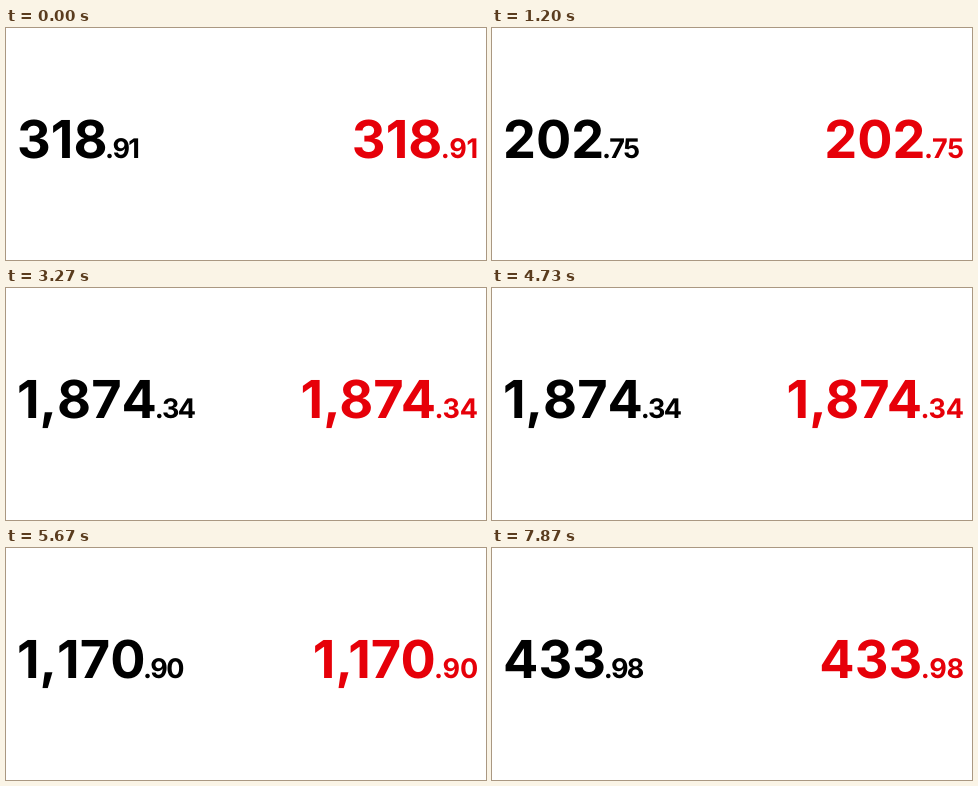
Write an HTML page with a canvas that moves like this. It is 480 by 232 pixels and loops after 8000 ms.

```html
<!DOCTYPE html>
<html lang="en">
<head>
<meta charset="utf-8">
<title>Rolling numbers</title>
<style>
  html, body { margin: 0; width: 100%; height: 100%; overflow: hidden; background: #fff; }
  canvas { display: block; width: 480px; height: 232px; }
</style>
</head>
<body>
<canvas id="stage" width="480" height="232"></canvas>
<script>
const ctx = document.getElementById('stage').getContext('2d');
const LOOP = 8000, FRAME = 1000 / 15;
const BASELINE = 130, LEFT = 11, RIGHT = 472, JOIN = 1.5, TRAVEL = 64;

// Glyphs are set at text size and scaled up, which keeps the text cut of the typeface
const TEXT_SIZE = 14;
ctx.font = `700 ${TEXT_SIZE}px Inter, sans-serif`;
ctx.textRendering = 'geometricPrecision';
const ZERO_WIDTH = ctx.measureText('0').width;

// A type style is a size and the advance of the digit zero
function typeStyle(size, zeroAdvance) {
  const scale = size / TEXT_SIZE;
  return { scale, tracking: zeroAdvance / scale - ZERO_WIDTH };
}
const BIG = typeStyle(52.3, 35.3);
const SMALL = typeStyle(27, 18);
const SMALL_TIGHT = typeStyle(27, 16.5);

function width(text, { scale, tracking }) {
  ctx.letterSpacing = `${tracking}px`;
  return ctx.measureText(text).width * scale;
}

function drawText(text, x, y, { scale, tracking }) {
  ctx.save();
  ctx.letterSpacing = `${tracking}px`;
  ctx.translate(x, y);
  ctx.scale(scale, scale);
  ctx.fillText(text, tracking / 2, 0);
  ctx.restore();
}

// Columns of the rolling number, left to right
const THOUSANDS = 0, COMMA = 1, HUNDREDS = 2, TENS = 3, ONES = 4, POINT = 5, TENTHS = 6, HUNDREDTHS = 7;
const initial = ['', '', '3', '1', '8', '.', '9', '1'];

// [start, duration, column, new character], in order of time
const rolls = [
  [475, 280, ONES, '2'],
  [475, 280, HUNDREDTHS, '5'],
  [540, 280, TENTHS, '7'],
  [690, 280, TENS, '0'],
  [900, 290, HUNDREDS, '2'],

  [2801, 1, THOUSANDS, '2'],
  [2801, 1, COMMA, ','],
  [2801, 1, ONES, '7'],
  [2801, 1, TENTHS, ''],
  [2801, 1, HUNDREDTHS, ''],
  [2802, 172, TENS, '1'],
  [2802, 212, TENTHS, '0'],
  [2802, 140, HUNDREDTHS, '0'],
  [2890, 270, ONES, '4'],
  [2930, 290, HUNDREDS, '8'],
  [2950, 250, HUNDREDTHS, '4'],
  [2970, 280, TENS, '7'],
  [2990, 270, THOUSANDS, '1'],
  [3010, 250, TENTHS, '3'],

  [4815, 330, ONES, '0'],
  [4815, 330, HUNDREDTHS, '0'],
  [4865, 330, TENTHS, '9'],
  [5350, 310, HUNDREDS, '1'],

  [7275, 300, ONES, '3'],
  [7275, 300, HUNDREDTHS, '8'],
  [7330, 300, TENS, '3'],
  [7390, 300, HUNDREDS, '4'],
  [7430, 290, THOUSANDS, ''],
  [7430, 290, COMMA, '']
];

// [start, whole part, decimals]
const totals = [
  [0, '318', '.91'],
  [530, '202', '.75'],
  [2860, '1,874', '.34'],
  [4860, '1,170', '.90'],
  [7330, '433', '.98']
];

const easeOut = x => 1 - (1 - x) ** 3;

function columnsAt(time) {
  const columns = initial.map(char => ({ from: char, to: char, progress: 1 }));
  for (const [start, duration, index, char] of rolls) {
    if (time < start) break;
    const progress = easeOut(Math.min(1, (time - start) / duration));
    columns[index] = { from: columns[index].to, to: char, progress };
  }
  return columns;
}

function drawRolling(time) {
  ctx.save();
  ctx.beginPath();
  ctx.rect(0, 78, 480, 66);
  ctx.clip();
  ctx.fillStyle = '#000';
  let x = LEFT;
  columnsAt(time).forEach(({ from, to, progress }, index) => {
    const style = index < POINT ? BIG : SMALL_TIGHT;
    if (index === POINT) x -= JOIN;
    if (progress < 1) {
      ctx.globalAlpha = Math.sqrt(1 - progress);
      drawText(from, x, BASELINE - TRAVEL * progress, style);
      ctx.globalAlpha = 1;
    }
    drawText(to, x, BASELINE + TRAVEL * (1 - progress), style);
    x += width(from, style) * (1 - progress) + width(to, style) * progress;
  });
  ctx.restore();
}

function drawTotal(time) {
  const [, whole, decimals] = totals.filter(([start]) => time >= start).pop();
  ctx.fillStyle = '#e60009';
  const split = RIGHT - width(decimals, SMALL);
  drawText(decimals, split, BASELINE, SMALL);
  drawText(whole, split + JOIN - width(whole, BIG), BASELINE, BIG);
}

function draw() {
  // Motion advances in steps of 15 per second
  const time = Math.floor((performance.now() % LOOP + 4) / FRAME) * FRAME;
  ctx.fillStyle = '#fff';
  ctx.fillRect(0, 0, 480, 232);
  drawRolling(time);
  drawTotal(time);
  requestAnimationFrame(draw);
}
draw();
</script>
</body>
</html>
```
